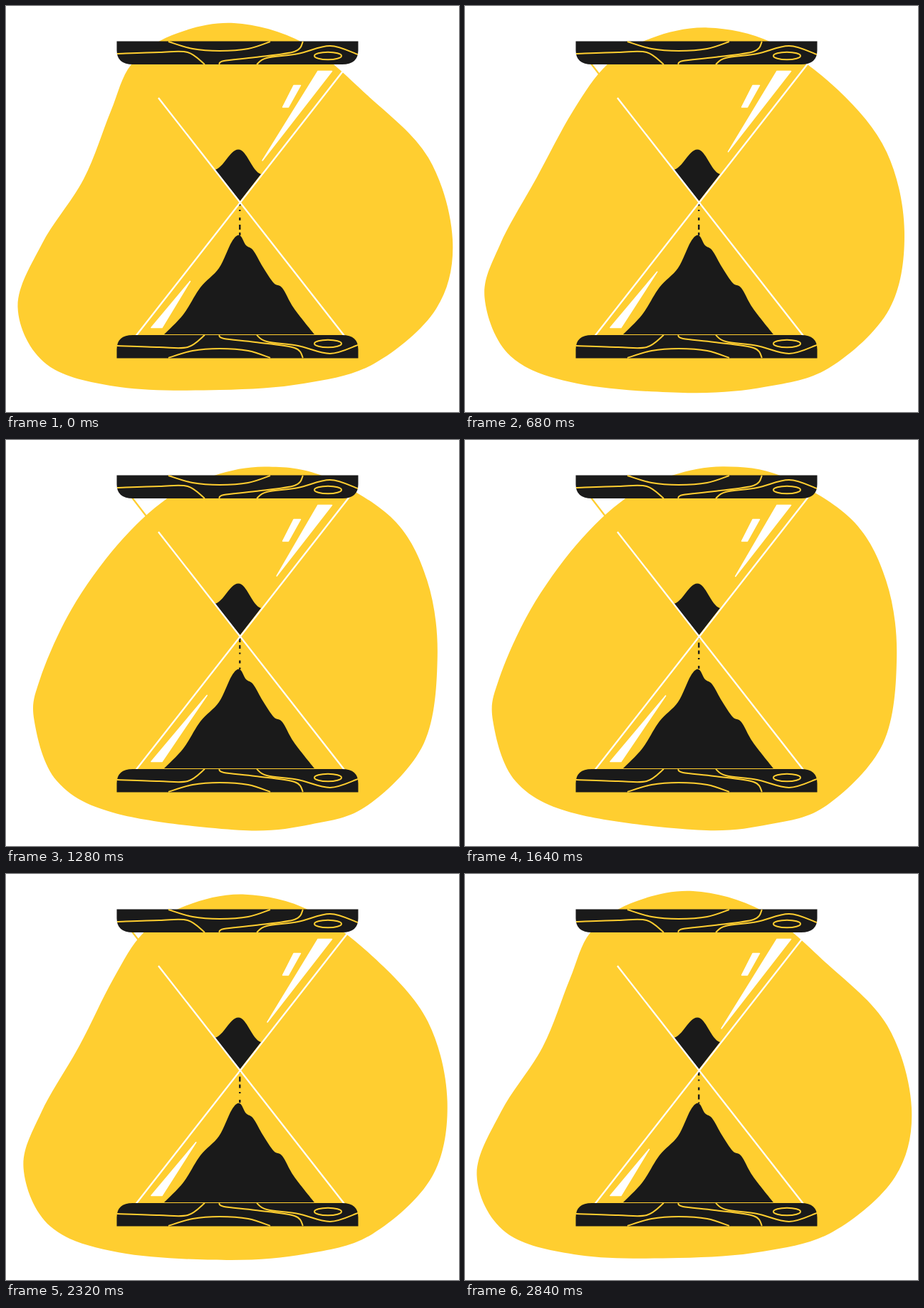
An HTML page for the animation above (2880 ms loop, 636 by 570 pixels).

```html
<!DOCTYPE html>
<html lang="en">
<head>
<meta charset="utf-8">
<title>Hourglass</title>
<style>
  html, body { margin: 0; width: 100%; height: 100%; overflow: hidden; background: #fff; }
  svg { display: block; width: 100%; height: 100%; }
</style>
</head>
<body>
<svg viewBox="0 0 636 570">
  <defs>
    <g id="bar">
      <path fill="#1a1a1a" d="M155.500 49.500H494.500V62Q494.500 82 472 82H178Q155.500 82 155.500 62Z"/>
      <g fill="none" stroke="#ffce30" stroke-width="2">
        <path id="wood"/>
        <ellipse cx="452" cy="70" rx="19" ry="5.3"/>
      </g>
    </g>
  </defs>
  <path id="blob" fill="#ffce30"/>
  <g fill="#1a1a1a">
    <path d="M293 230C306 227 314 202 326 201.500S345 232 358 236L328.500 274Z"/>
    <path id="heap"/>
  </g>
  <path id="grains" d="M328.300 277V322" fill="none" stroke="#1a1a1a" stroke-width="2.400" stroke-dasharray="2 9 4 6 7 4 5 5.5"/>
  <g fill="none" stroke="#fff" stroke-width="2.300">
    <path d="M177 81L214 129" stroke="#ffce30"/>
    <path d="M214 129L475 463M182.500 463L482 80"/>
  </g>
  <g fill="#fff" stroke="#fff" stroke-width="1.500" stroke-linejoin="round">
    <path d="M404 111.500H413.500L396.500 142H388.500Z"/>
    <path id="shineTop"/>
    <path id="shineLow"/>
  </g>
  <use href="#bar"/>
  <use href="#bar" transform="matrix(1 0 0 -1 0 544)"/>
</svg>
<script>
const LOOP = 2880, STEP = 40;
const DASH = 42.5, DASH_TIME = 680 / 6;

const mix = (a, b, p) => a + (b - a) * p;
const smooth = s => s * s * (3 - 2 * s);
const set = (id, name, value) => document.getElementById(id).setAttribute(name, value);

// "x,y x,y" to a list of points
const points = text => text.split(' ').map(pair => pair.split(',').map(Number));

// Smooth curve through the points (Catmull-Rom as cubic segments)
function spline(pts, closed) {
  const n = pts.length;
  const at = i => pts[closed ? (i + n) % n : Math.min(Math.max(i, 0), n - 1)];
  const handle = (i, side) =>
    at(i).map((v, k) => (v + side * (at(i + 1)[k] - at(i - 1)[k]) / 6).toFixed(2));
  let d = 'M' + pts[0];
  for (let i = 0; i < (closed ? n : n - 1); i++) {
    d += `C${handle(i, 1)} ${handle(i + 1, -1)} ${at(i + 1)}`;
  }
  return d;
}

const wide = points('320,24 418,52 507,125 593,213 627,328 604,425 517,502 418,530 300,539 160,535 57,503 16.5,423 51,333 109,243 147,148 176,82 233,41');
const round = points('366,38 447,51 545,111 591,196 605,303 586,426 508,513 428,540 328,548 155,524 72,478 40.5,393 47.5,336 91,238 157,147 228,82 295,50');
const heap = points('222,461 249,433 273,395 299,368 317,331 328,322 337,336 347,343 361,367 376,389 388,396 404,424 433,461');
const grain = [
  '156,67 215,65 255,65 279,82',
  '228,50 262,60 300,63 340,60 371,50',
  '299,82 306,77 350,72 405,64 417,50',
  '352,82 366,73 410,67 455,56 494,68'
];

set('heap', 'd', spline(heap));
set('wood', 'd', grain.map(line => spline(points(line))).join(''));

function draw(now) {
  const t = Math.floor((now % LOOP) / STEP + 1e-6) * STEP;
  const p = smooth(1 - Math.abs(1 - t / (LOOP / 2)));

  const outline = wide.map((pt, i) => pt.map((v, k) => mix(v, round[i][k], p)));
  set('blob', 'd', spline(outline, true));
  set('shineTop', 'd', `M438 91.500H457.500L${mix(360, 380.8, p)} ${mix(217, 190, p)}Z`);
  set('shineLow', 'd', `M204 451.500H219L${mix(258.5, 283, p)} ${mix(386.5, 357.5, p)}Z`);
  set('grains', 'stroke-dashoffset', -9 - t / DASH_TIME * DASH % DASH);
}

const start = performance.now();
function tick() {
  draw(performance.now() - start);
  requestAnimationFrame(tick);
}
draw(0);
requestAnimationFrame(tick);
</script>
</body>
</html>
```
